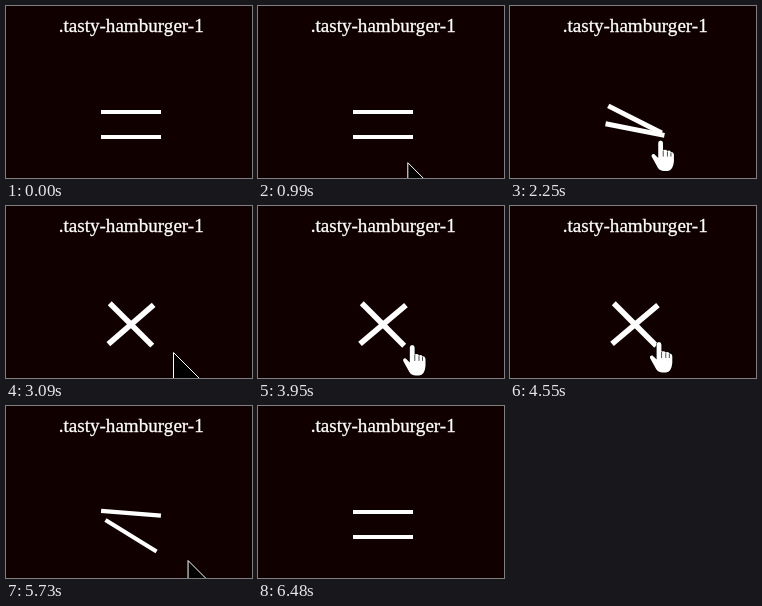
An HTML page that plays this animation: 246x172 px, repeating every 6.8 s.

```html
<!DOCTYPE html>
<html lang="en">
<head>
<meta charset="utf-8">
<title>Hamburger toggle</title>
<style>
  html, body { margin: 0; width: 100%; height: 100%; overflow: hidden; background: #100000; }
  svg { display: block; width: 246px; height: 172px; }
  text {
    font: 19.1px "Liberation Serif", "Times New Roman", serif;
    fill: #fff; stroke: #fff; stroke-width: .3; text-anchor: middle;
  }
  .bar, #hand { fill: #fff; }
  #hand { stroke: #000; }
  #arrow { fill: #000; stroke: #fff; }
</style>
</head>
<body>
<svg viewBox="0 0 246 172">
  <text x="125.2" y="26">.tasty-hamburger-1</text>
  <rect id="top" class="bar" x="-30" width="60"/>
  <rect id="bottom" class="bar" x="-30" width="60"/>
  <path id="arrow" d="M.5 .5L27 27H14L20 42L14 45L8 29L.5 37Z"/>
  <g id="hand">
    <path paint-order="stroke" d="M-2.4 2.5a2.4 2.5 0 0 1 4.8 0V9.5Q5.5 8.5 6.8 10.5Q9.3 9.3 10.3 11.5Q13 11 13.3 14V21Q12.5 30 7 30.5H3Q-2 30 -4 25L-9 16Q-9.5 13 -6.5 13.5L-2.4 17.5Z"/>
    <path stroke-width=".7" d="M2.6 10v6M6.8 11v5M10.3 12v4"/>
  </g>
</svg>
<script>
const LOOP = 6800, OPEN = 1750, CLOSE = 4825, SPAN = 1450;

// The pointer rests between moves
const home = { x: 151, y: 174 };
const moves = [
  { from: 690, to: 1360, x: 147, y: 132 },
  { from: 2050, to: 2790, x: 167, y: 146 },
  { from: 3500, to: 4200, x: 149, y: 136 },
  { from: 4860, to: 5090, x: 167, y: 142 },
  { from: 5290, to: 6170, x: 196, y: 166 },
  { from: 6430, to: 6480, x: 199, y: 174 }
];

const el = id => document.getElementById(id);
const clamp = v => Math.min(1, Math.max(0, v));
const place = (id, x, y, angle = 0) =>
  el(id).setAttribute("transform", `translate(${x} ${y}) rotate(${angle})`);
const show = (id, on) => el(id).setAttribute("visibility", on ? "visible" : "hidden");

// CSS "ease" curve, solved by bisection
function ease(x) {
  x = clamp(x);
  let lo = 0, hi = 1, u;
  for (let i = 0; i < 24; i++) {
    u = (lo + hi) / 2;
    if (.75 * u * (1 - u) + u ** 3 < x) lo = u; else hi = u;
  }
  return .3 * u * (1 - u) ** 2 + 3 * u * u * (1 - u) + u ** 3;
}

function pointer(t) {
  let { x, y } = home;
  for (const m of moves) {
    const k = clamp((t - m.from) / (m.to - m.from));
    const s = k * k * (3 - 2 * k);
    x += (m.x - x) * s;
    y += (m.y - y) * s;
  }
  return [x, y];
}

function bar(id, y, angle, height) {
  el(id).setAttribute("y", -height / 2);
  el(id).setAttribute("height", height);
  place(id, 125, y, angle);
}

function draw(t) {
  const p = ease((t - OPEN) / SPAN) - ease((t - CLOSE) / SPAN);
  const height = 4 + 1.6 * p;
  bar("top", 106 + 12.5 * p, 45 * p, height);
  bar("bottom", 131 - 12.5 * p, 320 * p, height);

  const [x, y] = pointer(t);
  const hover = x < 155 && y < 143;
  show("hand", hover);
  show("arrow", !hover);
  place(hover ? "hand" : "arrow", x, y);
}

const start = performance.now();
function tick() {
  draw((performance.now() - start) % LOOP);
  requestAnimationFrame(tick);
}
tick();
</script>
</body>
</html>
```
